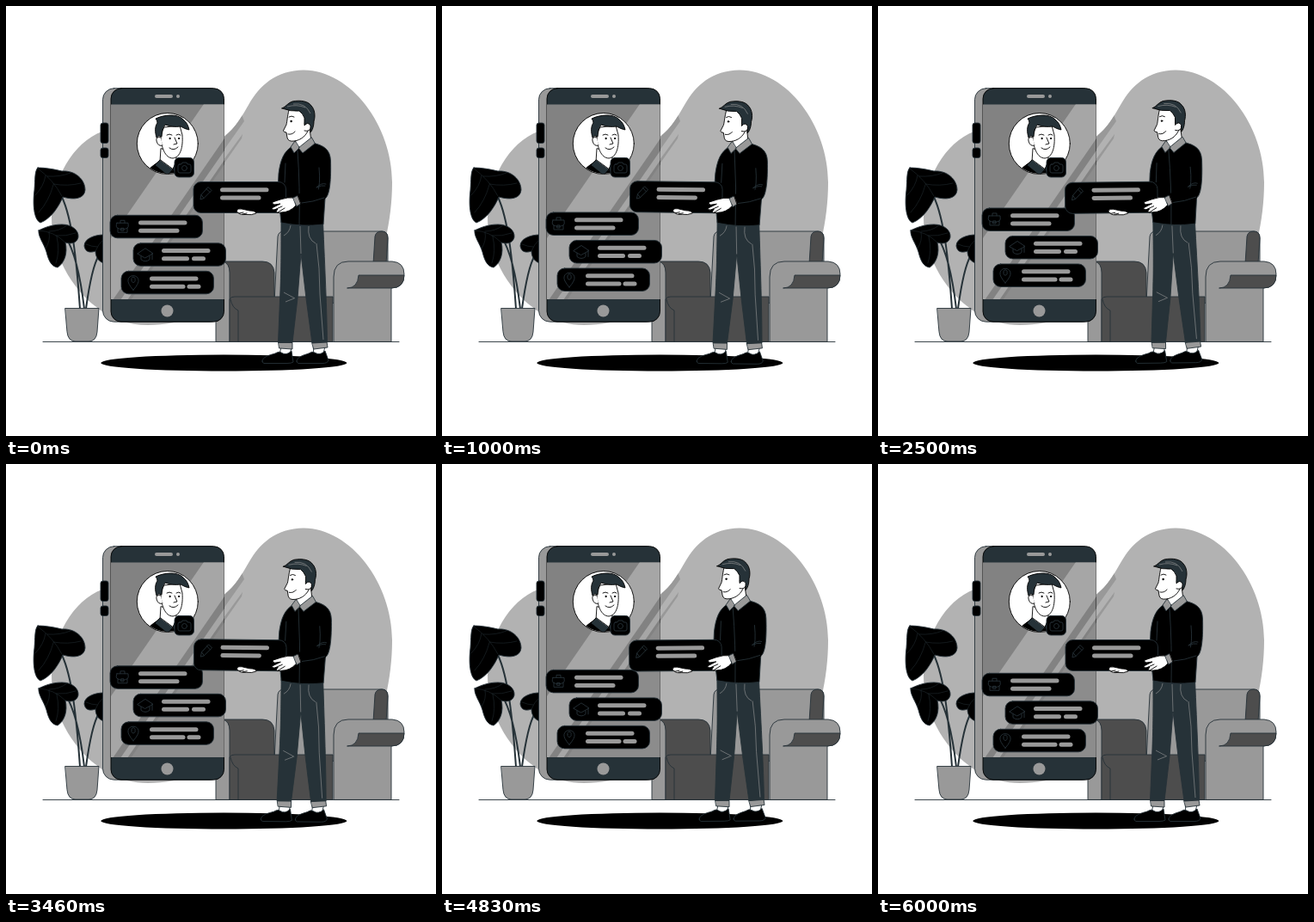
An HTML page that plays this animation: 500x500 px, repeating every 6.04 s.

```html
<!DOCTYPE html>
<html lang="en">
<head>
<meta charset="utf-8">
<title>Editing a profile</title>
<style>
html, body { margin: 0; width: 100%; height: 100%; overflow: hidden; background: #fff; }
svg { display: block; width: 100vw; height: 100vh; }
.o { stroke: #263238; stroke-width: .9; stroke-linejoin: round; stroke-linecap: round; }
.n { fill: none; }
.w { fill: #fff; }
.g { fill: #999; }
.d { fill: #4d4d4d; }
.s { fill: #263238; }
.k { fill: #000; }
.b { stroke: #000; }
.thin { fill: none; stroke-width: .5; }
.stem { fill: none; stroke-width: 2; }
.seam { fill: none; stroke: #999; stroke-width: .6; }
</style>
</head>
<body>
<svg viewBox="0 0 500 500">
  <defs>
    <clipPath id="screen"><path d="M122 114.500H253.500V341H122Z"/></clipPath>
    <clipPath id="disc"><circle cx="187.800" cy="160" r="35"/></clipPath>
    <clipPath id="blobClip"><use href="#blob"/></clipPath>
  </defs>

  <!-- backdrop -->
  <path id="blob" fill="#b2b2b2" d="M112 146C78 158 53 202 53 246C53 288 76 328 105 350C122 364 142 371 165 371C205 371 232 356 262 350L420 330C438 296 449 250 449 205C449 140 402 75 346 74.500C314 75 295 92 282 115C270 136 262 149 240 160C180 150 145 134 112 146Z"/>
  <g clip-path="url(#blobClip)" fill="#999">
    <path d="M253 154L274 126L277 134L253 168Z"/>
    <path d="M253 179L275 149L274 154L253 184Z"/>
  </g>
  <path class="o n" d="M43 390.500H457"/>
  <ellipse cx="253.300" cy="415" rx="143" ry="9.500"/>

  <!-- sofa -->
  <g class="o">
    <path class="g" d="M312 345L316 268Q317 262 323 262H437Q444 262 444 270V345Z"/>
    <path class="d" d="M427 300L429 268Q430 262 437 262Q444 262 444 270L442 300Z"/>
    <path class="d" d="M250 297H298Q311 297 312 310V345H255Z"/>
    <path class="g" d="M244 390V306Q244 297 252 297Q260 299 260 310V390Z"/>
    <path class="d" d="M260 390V341Q261 338 266 338H380V390Z"/>
    <path class="n" d="M261 341Q263 351 270 354V390"/>
    <path class="g" d="M381 390V315Q381 297 398 297H449Q463 298 463 312Q463 328 448 328V390Z"/>
    <path class="d" d="M397 328Q409 328 410 313H463Q463 328 448 328Z"/>
  </g>

  <!-- plant -->
  <g class="o">
    <path class="stem" d="M65 222C77 248 82 295 86 352M69 268C80 285 87 318 91 352M108 290C100 303 96 330 93 352"/>
    <path class="k" d="M37 188C46 188 57 190 65 192C81 191 92 202 92 214C91 224 80 226 66 222C62 232 53 247 40 252C32 248 31 230 33 214C34 202 33 192 37 188Z"/>
    <path class="thin" d="M37 189Q55 202 65 221M48 198Q63 199 75 194M55 207Q72 210 87 206M46 197Q44 210 34 220M55 208Q50 227 38 240"/>
    <path class="k" d="M38 261C44 258 53 254 65 254C77 254 85 261 84 269C82 276 76 277 69 275C72 287 68 299 60 304C52 303 49 294 47 286C44 276 37 268 38 261Z"/>
    <path class="thin" d="M38 261Q56 262 69 275M50 262Q62 262 71 255M58 267Q70 268 81 264M50 263Q52 273 46 282M59 268Q63 285 58 299"/>
    <path class="k" d="M113 266C104 266 91 270 91 279C92 287 99 287 104 285C104 293 109 298 114 299Z"/>
    <path class="thin" d="M113 272Q107 277 104 285M93 277Q100 280 106 280"/>
    <path class="g" d="M69 351.500H108L106 379Q105 390 96 390H81Q72 390 71 379Z"/>
  </g>

  <!-- phone -->
  <g class="o">
    <rect class="g" x="112.500" y="95.700" width="138" height="271.500" rx="13"/>
    <rect class="k" x="110" y="136" width="9" height="23.500" rx="2.500"/>
    <rect class="k" x="110" y="165" width="9" height="11.500" rx="2.500"/>
    <rect class="s b" x="122" y="95.700" width="131.500" height="271.500" rx="12"/>
  </g>
  <g clip-path="url(#screen)">
    <path fill="#828282" d="M122 114H254V342H122Z"/>
    <path fill="#a6a6a6" d="M230 114H254V154L124 342H122V270ZM254 168V179L141 342H133Z"/>
    <path fill="#8c8c8c" d="M254 184V342H145Z"/>
  </g>
  <rect class="g" x="173" y="103" width="21" height="4" rx="2"/>
  <circle class="g" cx="200" cy="105" r="2"/>
  <circle class="g" cx="187.500" cy="354.500" r="7"/>

  <!-- portrait -->
  <circle class="o w b" cx="187.800" cy="160" r="35.500"/>
  <g clip-path="url(#disc)" class="o b">
    <path class="k" d="M163 200L168 188Q174 183 180 180L201 179Q214 183 219 200Z"/>
    <path class="w" d="M180 166L179 181L193 192L198 182L198 172Z"/>
    <path class="s" d="M179 179L173 185L188 197L194 190ZM198 180L194 190L198 196L202 183Z"/>
    <path class="w" d="M180 150C180 164 185 177 194 177C203 176 206 164 205 150L202 139L184 141Z"/>
    <path class="w" d="M180 153Q174 151 175 157Q177 164 182 162"/>
    <path class="s" d="M175 153C173 146 173 140 176 136Q176 133 174 131C184 126 200 125 206 132C210 135 212 139 213 144Q208 143 203 140C197 141 190 140 185 138Q181 143 181 152L178 151Z"/>
    <path class="n" d="M187 150Q190 148 193 150M198 150Q201 148 203 150M196 153L199 160L195 161M190 165Q195 169 200 164"/>
    <circle class="k" cx="190.500" cy="154" r=".7"/><circle class="k" cx="201" cy="154" r=".7"/>
  </g>
  <g class="o">
    <rect class="k" x="196" y="176.500" width="22.500" height="22.500" rx="5"/>
    <path class="n" d="M202 184H204L205 182H210L211 184H213Q215 184 215 186V192Q215 194 213 194H202Q200 194 200 192V186Q200 184 202 184Z"/>
    <circle class="n" cx="207.500" cy="188.500" r="3"/>
  </g>

  <g id="bars"></g>

  <!-- man with the card -->
  <g id="man">
    <g class="o">
      <path class="w" d="M320 396L318 406L330 408L332 396ZM358 396L357 406L368 408L371 396Z"/>
      <path class="k" d="M298 413C298 408 306 406 313 404Q318 401 320 403Q326 407 332 401L334 414Q332 415.500 327 415.500H300Q298 415 298 413ZM338 413C338 408 346 406 352 404Q356 401 359 403Q365 407 371 401L375 412Q374 415.500 368 415.500H340Q338 415 338 413Z"/>
      <path class="g" d="M317 391.500H333V399L318 398ZM356 391.500L373 390L374 397L358 399Z"/>
      <path class="s" d="M320 250C320 285 320 305 319 330L316.500 391.500H333L339 340L343 288L349 340L356 392L373.500 391C373 350 371 310 368.500 250Z"/>
    </g>
    <path class="seam" d="M352 256Q350 271 360 276M361 276Q365 305 365 335L369 388M331 255Q330 263 323 267M323 333L336 340M325 344L335 340M342 256L343 288"/>
    <path class="o k" d="M333 163C323 169 319 179 317 195L316 215L320 252Q345 257 369 254L371 224C377 220 378 200 377.500 180C377 167 370 162 356 159Z"/>
    <path class="o n" d="M339 168Q342 210 341 254M364 188Q366 208 362 217M369 223L349 229M325 183L324 205M361 211Q367 205 372 207"/>
    <g class="o b">
      <path class="w" d="M338 147L336 162L339 167L355 158L353 142Z"/>
      <path class="g o" d="M336 157L331 164L335 171L341 165ZM355 153L340 165L345 171L359 160Z"/>
      <path class="w" d="M329 121C327 129 327 134 326 138L322.500 145Q323 147 326 147L327 153Q328 158 335 157C343 156 349 151 352 143L350 120Z"/>
      <path class="w" d="M347 136Q353 132 355 139Q354 147 347 145"/>
      <path class="s" d="M321 119C326 117 327 113 333 111C343 109 352 111 355 116C359 120 360 128 358 134C358 140 356 145 354 147L354 139Q351 134 347 139L347 130Q345 125 341 122Q331 123 321 119Z"/>
      <path class="n" d="M329 129Q332 127 335 129M328 149Q333 150 336 146"/>
      <circle class="k" cx="331.500" cy="134" r=".8"/>
    </g>
    <path class="seam" d="M327 117Q338 114 348 118M334 114Q348 112 354 125"/>
    <g id="card"></g>
    <g class="o b">
      <path class="w" d="M268 238Q270 235 274 236L283 238Q290 238 291 241Q286 243.500 279 242.500Q272 243 271 241Q268 240 268 238Z"/>
      <path class="n" d="M271 241L276 240M275 242L280 241"/>
      <path class="w" d="M336 223Q327 222 319 225L310 228Q309 230 312 231L319 230L309 235Q309 237 312 237L316 236L314 239Q315 241 320 240Q330 240 337 232Z"/>
      <path class="n" d="M312 237L321 233M316 240L324 235"/>
      <path class="g o" d="M334 223L340 220L344 229L338 233Z"/>
      <path class="k" d="M339 219Q352 217 361 211L371 224Q358 229 343 230Z"/>
    </g>
    <path class="o n" d="M344 229Q357 228 370 223M361 211Q367 208 371 209"/>
  </g>
</svg>
<script>
const $ = id => document.getElementById(id);

// lines: [x, y, width] relative to the panel's corner
const panel = (x, y, h, icon, lines) => `<g transform="translate(${x} ${y})">
  <rect class="o k" width="107.500" height="${h}" rx="8.500"/>
  <path class="o n" d="${icon}"/>
  ${lines.map(([lx, ly, w]) =>
    `<rect class="g" x="${lx}" y="${ly}" width="${w}" height="5" rx="2.500"/>`).join('')}
</g>`;

const briefcase = 'M8 9H21Q22 14 20 15V20H9V15Q6 14 8 9ZM12 9V6H17V9M9 15Q14 18 20 15M13 15H16V18H13Z';
const cap = 'M5 12L14 6L23 12L14 17ZM9 15V19Q14 23 19 19V15M22 12V19';
const pin = 'M14 22Q7 14 8 10A6.200 6.200 0 0 1 20 10Q21 14 14 22ZM12 10A2.200 2.200 0 1 1 16 10A2.200 2.200 0 1 1 12 10';
const pencil = 'M8 20L9 15L17 6L21 10L12 19ZM9 15L12 19M15 8L19 12';

const split = [[33, 6.3, 56.5], [33, 15.5, 32], [68, 15.5, 16]];
const pinned = [[33, 6.3, 56.5], [33, 15.5, 41.5], [76.5, 15.5, 16]];

$('bars').innerHTML =
  panel(121, 243.3, 26.5, briefcase, [[33, 6.3, 56.5], [33, 15.5, 47.5]]) +
  panel(148, 275.8, 26.5, cap, split) +
  panel(134, 308.3, 26.5, pin, pinned);
$('card').innerHTML = panel(218, 204.5, 36, pencil, [[31, 6.8, 56.5], [31, 16, 47.5]]);

const triangle = p => 1 - Math.abs(1 - 2 * p);

function draw(now) {
  const t = Math.min(now % 6040, 6000);
  const p = t / 3000 % 1;
  const tilt = p < .25 ? 4 * p : p < .75 ? 2 - 4 * p : 4 * p - 4;
  $('bars').setAttribute('transform', `translate(0 ${-10 * triangle(t / 6000)})`);
  $('man').setAttribute('transform', `rotate(${tilt} 298 262.500)`);
}

const start = performance.now();
function tick(now) {
  draw(Math.max(0, now - start));
  requestAnimationFrame(tick);
}
requestAnimationFrame(tick);
</script>
</body>
</html>
```
